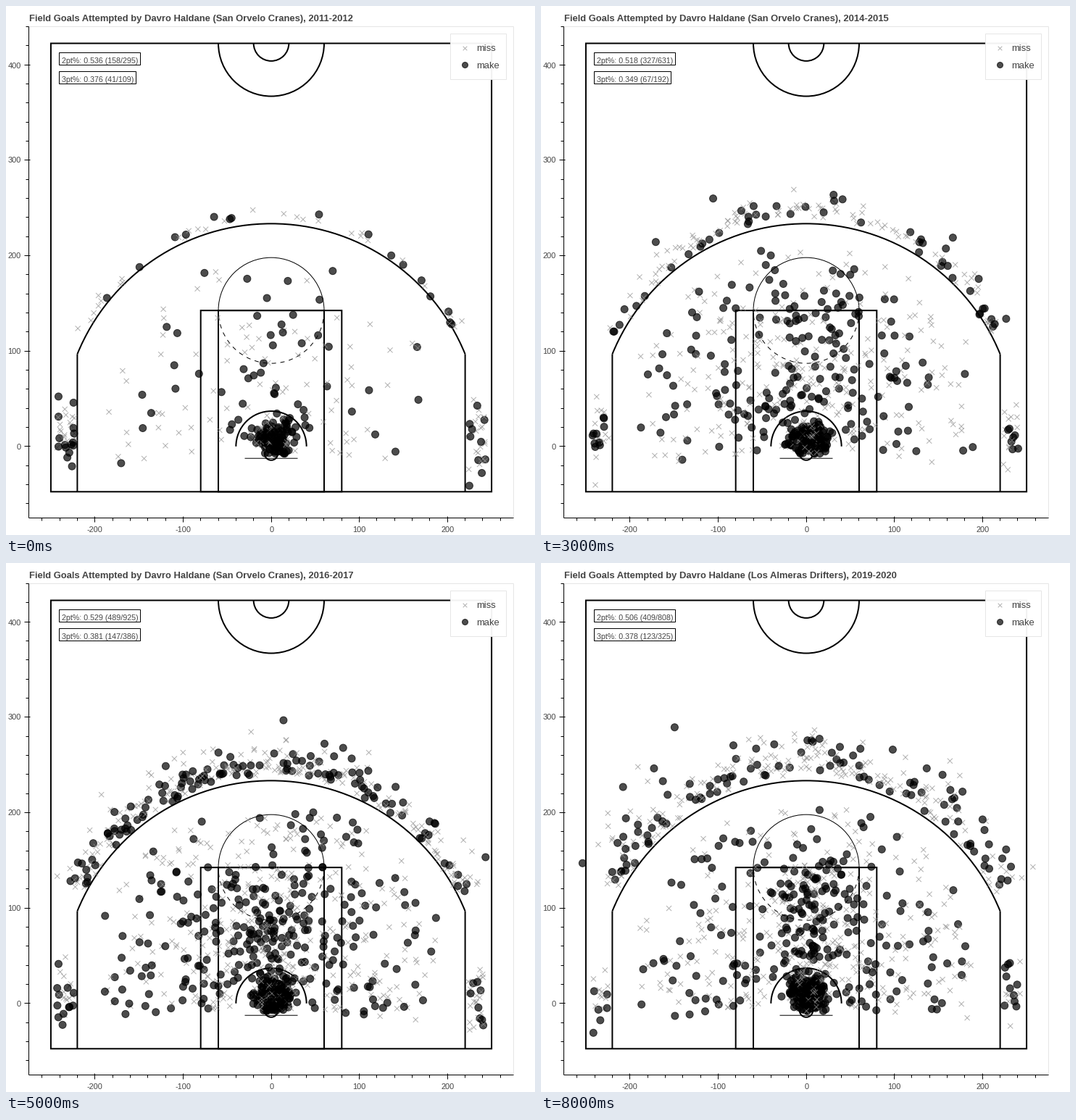
These frames come from a looping animation (730 by 730 pixels, 10000 ms). A matplotlib script:

```python
import numpy as np
import matplotlib.pyplot as plt
from matplotlib.animation import FuncAnimation
from matplotlib.collections import PathCollection
from matplotlib.colors import to_rgba
from matplotlib.patches import Arc, Rectangle
from matplotlib.path import Path
from matplotlib.transforms import IdentityTransform

SIZE, DPI = 730, 100
PX = 72 / DPI                       # points per pixel
LEFT, RIGHT, TOP, BOTTOM = 31.5, 700.5, 28.5, 706.5
SX = (RIGHT - LEFT) / 550
SY = (BOTTOM - TOP) / 515
INK = "#444444"

plt.rcParams["font.family"] = "Liberation Sans"
plt.rcParams["path.snap"] = False

PLAYER = "Davro Haldane"
CRANES = "San Orvelo Cranes"
CURLEWS = "Velmora Curlews"
DRIFTERS = "Los Almeras Drifters"
GREY = ("black", "#929292")         # make, miss
CRIMSON = ("#ce1141", "black")
FIRST_YEAR = 2011

# team, (made, tried) for two and three points, first legend entry
SEASONS = [
    (CRANES, (158, 295), (41, 109), "miss"),
    (CRANES, (196, 354), (65, 174), "make"),
    (CRANES, (268, 463), (69, 182), "make"),
    (CRANES, (327, 631), (67, 192), "miss"),
    (CRANES, (422, 799), (129, 289), "make"),
    (CRANES, (489, 925), (147, 386), "miss"),
    (CRANES, (41, 76), (11, 35), "make"),
    (CURLEWS, (448, 827), (112, 302), "miss"),
    (DRIFTERS, (409, 808), (123, 325), "miss"),
]


def X(x):
    return (LEFT + RIGHT) / 2 + SX * x


def Y(y):
    return TOP + SY * (440 - y)


def polar(r, degrees):
    a = np.radians(degrees)
    return r * np.cos(a), r * np.sin(a)


def two_pointer(rng, rim, lane):
    u = rng.random()
    if u < rim:
        return rng.normal(3, 11), abs(rng.normal(16, 9)) - 8
    if u < rim + lane:
        return rng.normal(3, 25), rng.uniform(22, 145)
    while True:
        x, y = polar(rng.uniform(45, 212), rng.uniform(-7, 187))
        if abs(x) < 190 and y > -18:
            return x, y


def three_pointer(rng, corner, depth):
    if rng.random() < corner:
        side = rng.choice([-1, 1])
        return side * rng.uniform(223, 243), rng.normal(10, 18)
    return polar(239 + rng.gamma(2, depth / 2), rng.uniform(28, 152))


def build(i):
    """Shots of season i: over the years they move away from rim and corners."""
    _, two, three, _ = SEASONS[i]
    rng = np.random.default_rng(FIRST_YEAR + i)
    rim = .42 + .28 * max(0, 1 - i / 4)
    lane = .10 + .012 * i
    corner = .5 * np.exp(-i / 5)
    depth = 6 + 1.6 * i
    shots = []
    for made in (True, False):
        n2, n3 = (m if made else tried - m for m, tried in (two, three))
        near = rim if made else rim / 2
        pts = [two_pointer(rng, near, lane) for _ in range(n2)]
        pts += [three_pointer(rng, corner, depth) for _ in range(n3)]
        shots += [((X(x), Y(y)), made) for x, y in pts]
    return [shots[k] for k in rng.permutation(len(shots))]


fig = plt.figure(figsize=(SIZE / DPI, SIZE / DPI), dpi=DPI, facecolor="white")
ax = fig.add_axes([0, 0, 1, 1])
ax.set(xlim=(0, SIZE), ylim=(SIZE, 0))
ax.axis("off")


def line(x0, y0, x1, y1, color="black", width=1, z=2):
    ax.plot([x0, x1], [y0, y1], color=color, lw=width * PX, zorder=z,
            solid_capstyle="butt")


def box(x0, y0, x1, y1, width=1, z=2, edge="black", face="none"):
    return ax.add_patch(Rectangle((x0, y0), x1 - x0, y1 - y0, fc=face, ec=edge,
                                  lw=width * PX, zorder=z))


def arc(y, r, start, end, width=2, style="-"):
    ax.add_patch(Arc((X(0), y), 2 * r, 2 * r, theta1=start, theta2=end,
                     lw=width * PX, ls=style, zorder=2))


def label(x, y, text="", size=11, z=5, **kw):
    return ax.text(x, y, text, fontsize=size * PX, color=INK, zorder=z,
                   va="baseline", **kw)


def draw_axes():
    line(LEFT, TOP, RIGHT, TOP, "#e5e5e5", z=1)
    line(RIGHT, TOP, RIGHT, BOTTOM, "#e5e5e5", z=1)
    line(LEFT, TOP, LEFT, BOTTOM)
    line(LEFT, BOTTOM, RIGHT, BOTTOM)
    for v in range(-260, 261, 20):
        major = v % 100 == 0
        x = np.floor(X(v)) + .5
        line(x, BOTTOM - 2 * major, x, BOTTOM + (6 if major else 4))
        if major:
            label(x, 726, str(v), ha="center")
    for v in range(-60, 441, 20):
        major = v % 100 == 0
        y = np.floor(Y(v)) + .5
        line(LEFT + 2 * major, y, LEFT - (6 if major else 4), y)
        if major:
            label(21, y + 4, str(v), ha="right")


def draw_court():
    base, key, half = Y(-47.5), Y(142.5), Y(422.5)
    box(X(-250), half, X(250), base, 2)
    for w in (80, 60):
        box(X(-w), key, X(w), base, 2)
    # the y axis points down, so 180-360 degrees is the upper half
    arc(key, 60 * SX, 180, 360, 1)
    arc(key, 60 * SX, 0, 180, 1, (0, (6, 6)))
    arc(Y(0), 40 * SX, 180, 360)
    arc(Y(-7.5), 7.5 * SX, 0, 360)
    line(X(-30), Y(-12.5), X(30), Y(-12.5))
    r = 237.5 * SX
    mid = Y(233.5) + r
    reach = np.degrees(np.arccos(220 / 237.5))
    arc(mid, r, 180 + reach, 360 - reach)
    for x in (-220, 220):
        line(X(x), base, X(x), mid - r * np.sin(np.radians(reach)), width=2)
    for radius in (60, 20):
        arc(half, radius * SX, 0, 180)


DISC = Path.circle((0, 0), 5)
ARM = 5 / np.sqrt(2)
CROSS = Path([(-ARM, -ARM), (ARM, ARM), (-ARM, ARM), (ARM, -ARM)],
             [Path.MOVETO, Path.LINETO, Path.MOVETO, Path.LINETO])


def marker_layer(z, scale=1):
    layer = PathCollection([DISC], sizes=[(scale * PX) ** 2], offsets=[(0, 0)],
                           offset_transform=ax.transData,
                           linewidths=PX, zorder=z)
    layer.set_transform(IdentityTransform())
    ax.add_collection(layer, autolim=False)
    return layer


def show_markers(layer, shots, colours):
    make, miss = (to_rgba(c, .7) for c in colours)
    points, made = zip(*shots)
    layer.set_paths([DISC if m else CROSS for m in made])
    layer.set_offsets(points)
    layer.set_facecolor([make if m else (0, 0, 0, 0) for m in made])
    layer.set_edgecolor([make if m else miss for m in made])


draw_axes()
draw_court()
box(613.5, 38.5, 690.5, 101.5, z=4, edge="#e5e5e5f2", face="#fffffff2")

title = label(LEFT, 21, size=13, weight="bold")
stats = [label(77, y, size=10.67) for y in (79, 105)]
frames = [box(73.5, y, 180, y + 17, z=4, face="white") for y in (64.5, 90.5)]
keys = [label(649, y, size=13) for y in (62.5, 85.5)]
dots = marker_layer(3)
key_dots = marker_layer(5, .8)
SHOTS = [build(i) for i in range(len(SEASONS))]


def update(i):
    i = min(i, len(SEASONS) - 1)        # the last season holds twice as long
    team, two, three, first = SEASONS[i]
    year = FIRST_YEAR + i
    colours = CRIMSON if team == CURLEWS else GREY
    title.set_text(f"Field Goals Attempted by {PLAYER} ({team}), {year}-{year + 1}")
    for n, (made, tried), text, frame in zip((2, 3), (two, three), stats, frames):
        text.set_text(f"{n}pt%: {made / tried:.3f} ({made}/{tried})")
        width = text.get_window_extent().width * SIZE / fig.bbox.width
        frame.set_width(round(width + 6.5))
    order = (first == "make", first == "miss")
    for text, made in zip(keys, order):
        text.set_text("make" if made else "miss")
    show_markers(key_dots, list(zip([(633.5, 58.5), (633.5, 81.5)], order)), colours)
    show_markers(dots, SHOTS[i], colours)
    return [title, dots, key_dots, *stats, *frames, *keys]


anim = FuncAnimation(fig, update, frames=10, interval=1000, repeat=True,
                     repeat_delay=0, blit=False)
plt.show()
```
